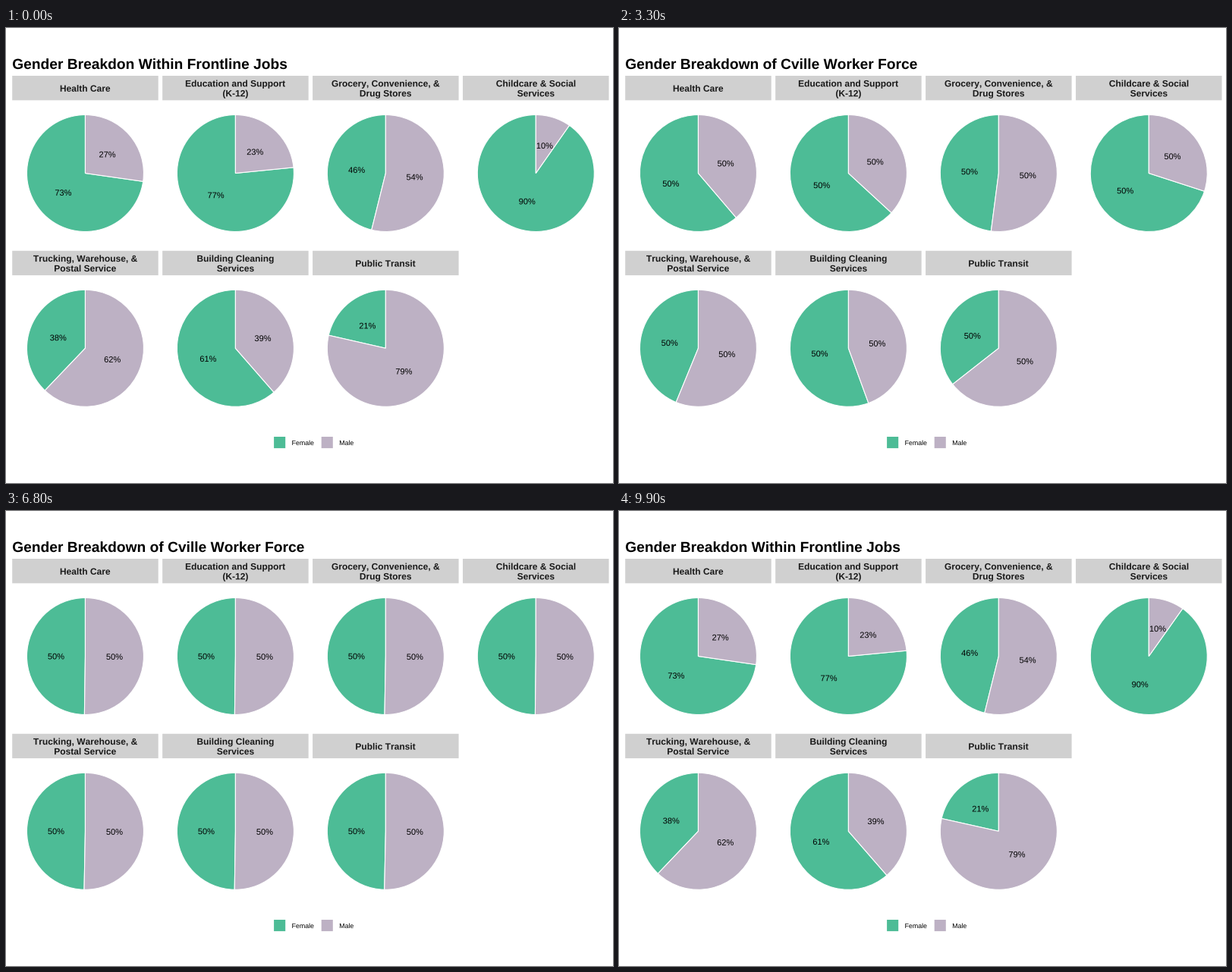
Animation of 800x600 px, one loop 10000 ms. Source, as a matplotlib script:

```python
import math

import matplotlib.pyplot as plt
from matplotlib.animation import FuncAnimation
from matplotlib.patches import PathPatch, Rectangle, Wedge
from matplotlib.textpath import TextPath
from matplotlib.transforms import Affine2D

plt.rcParams["text.kerning_factor"] = 6  # plain advances, no pair kerning

WIDTH, HEIGHT, DPI = 800, 600, 100
FRAMES, INTERVAL = 100, 100
LEAVE, EVEN, RETURN = 16, 50, 67  # frames where the pies start, settle, start back

FEMALE, MALE, STRIP = "#4dbc96", "#bdb1c4", "#d0d0d0"
LEFT, PANEL_W, STEP_X = 8.2, 192.5, 197.95
TOP, STRIP_H, STEP_Y = 63.0, 32.3, 230.8
PIE_Y, RADIUS = 191.5, 77
LABEL_SIZE = 11.04
EVEN_SHARE = 0.5027

TITLES = ("Gender Breakdon Within Frontline Jobs",
          "Gender Breakdown of Cville Worker Force")
JOBS = [
    ("Health Care", 0.2725),
    ("Education and Support\n(K-12)", 0.2342),
    ("Grocery, Convenience, &\nDrug Stores", 0.5387),
    ("Childcare & Social\nServices", 0.0972),
    ("Trucking, Warehouse, &\nPostal Service", 0.6213),
    ("Building Cleaning\nServices", 0.3858),
    ("Public Transit", 0.7856),
]

fig = plt.figure(figsize=(WIDTH / DPI, HEIGHT / DPI), dpi=DPI, facecolor="white")
ax = fig.add_axes([0, 0, 1, 1])
ax.set(xlim=(0, WIDTH), ylim=(HEIGHT, 0))
ax.axis("off")


def glyphs(text, size, weight="normal"):
    return TextPath((0, 0), text, size=size,
                    prop={"family": "Liberation Sans", "weight": weight})


def place(patch, x, y):
    patch.set_transform(Affine2D().scale(1, -1).translate(x, y) + ax.transData)


def add_text(path, x, y, color="black", centered=False):
    if centered:
        box = path.get_extents()
        x -= (box.x0 + box.x1) / 2
    patch = PathPatch(path, facecolor=color, linewidth=0, zorder=3)
    ax.add_patch(patch)
    place(patch, x, y)
    return patch


def add_box(x, y, w, h, color):
    ax.add_patch(Rectangle((x, y), w, h, facecolor=color, linewidth=0, snap=False))


class Pie:
    def __init__(self, index, heading, share):
        row, col = divmod(index, 4)
        left, top = LEFT + col * STEP_X, TOP + row * STEP_Y
        self.x, self.y = left + PANEL_W / 2, PIE_Y + row * STEP_Y
        self.share = share
        add_box(left, top, PANEL_W, STRIP_H, STRIP)
        lines = heading.split("\n")
        for i, line in enumerate(lines):
            base = top + 20.8 + 13 * (i - (len(lines) - 1) / 2)
            add_text(glyphs(line, 12, "bold"), self.x, base, "#1a1a1a", True)
        self.wedges, self.labels, self.paths = [], [], []
        for color, part in ((FEMALE, 1 - share), (MALE, share)):
            wedge = Wedge((self.x, self.y), RADIUS, 0, 90, facecolor=color,
                          edgecolor="white", linewidth=1.1 * 72 / DPI)
            self.wedges.append(ax.add_patch(wedge))
            self.paths.append([glyphs(f"{100 * p:.0f}%", LABEL_SIZE)
                               for p in (part, 0.5)])
            self.labels.append(add_text(self.paths[-1][0], self.x, self.y))

    def update(self, progress, state):
        share = self.share + (EVEN_SHARE - self.share) * progress
        split = -90 + 360 * share
        spans = ((split, 270), (-90, split))
        for wedge, label, paths, (start, end) in zip(
                self.wedges, self.labels, self.paths, spans):
            wedge.set_theta1(start)
            wedge.set_theta2(end)
            mid = math.radians((start + end) / 2)
            label.set_path(paths[state])
            place(label, self.x + RADIUS / 2 * math.cos(mid) - LABEL_SIZE,
                  self.y + RADIUS / 2 * math.sin(mid) + 4.2)


def ease(t):
    t = min(max(t, 0), 1)
    return (1 - math.cos(math.pi * t)) / 2


def update(frame):
    if frame <= RETURN:
        progress = ease((frame - LEAVE) / (EVEN - LEAVE))
    else:
        progress = 1 - ease((frame - RETURN) / (FRAMES - RETURN))
    state = int(progress > 0.5 - 1e-9)
    title.set_path(title_paths[state])
    for pie in pies:
        pie.update(progress, state)


title_paths = [glyphs(text, 19.2, "bold") for text in TITLES]
title = add_text(title_paths[0], LEFT, 54)
pies = [Pie(i, *job) for i, job in enumerate(JOBS)]
for x, color, name in ((353.1, FEMALE, "Female"), (415.7, MALE, "Male")):
    add_box(x, 539, 15.1, 15.1, color)
    add_text(glyphs(name, 8.8), x + 23.5, 550)

anim = FuncAnimation(fig, update, frames=FRAMES, interval=INTERVAL,
                     repeat=True, repeat_delay=0)
plt.show()
```
